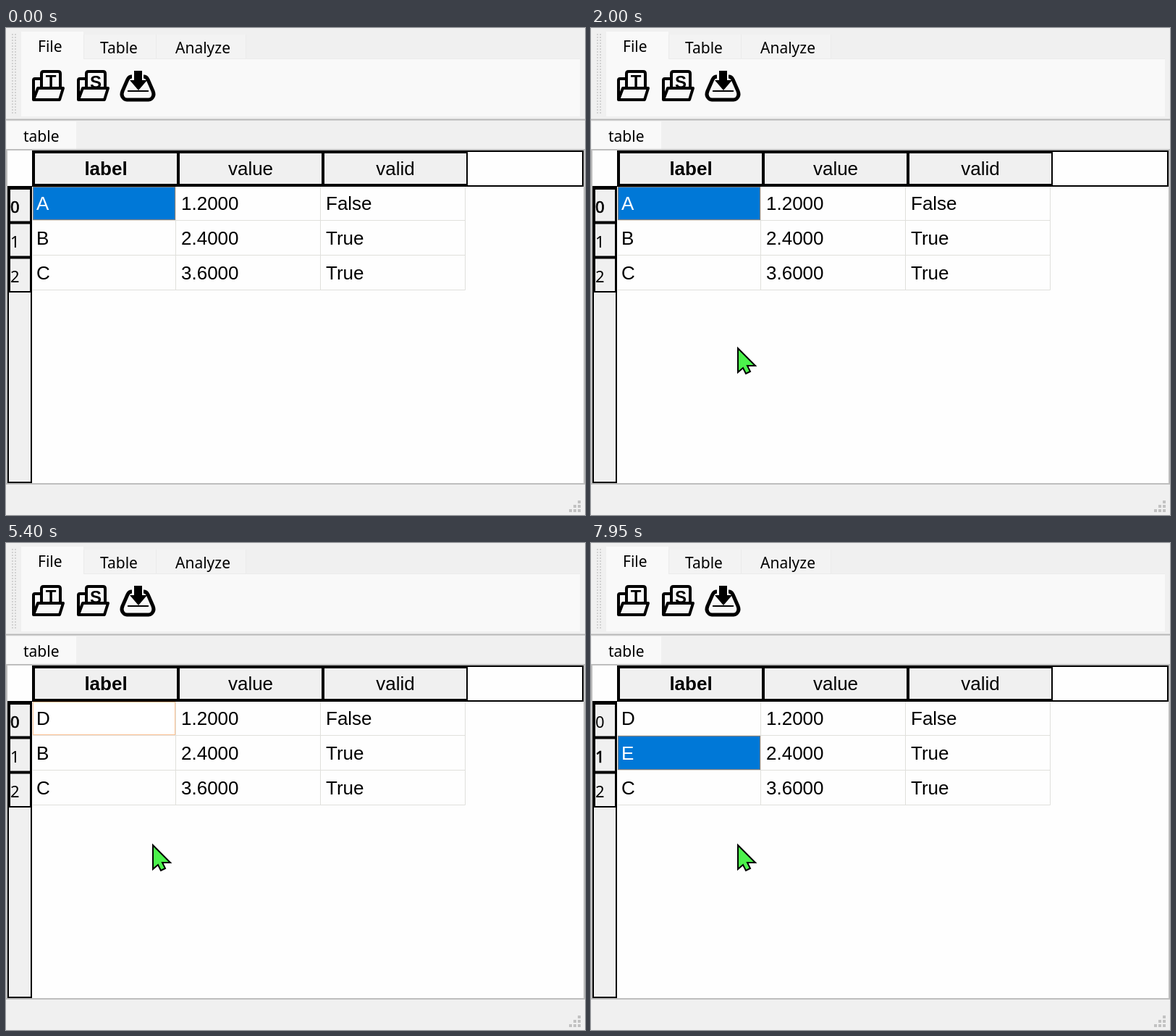
An HTML page for the animation above (8 s loop, 800x672 px).

```html
<!DOCTYPE html>
<html lang="en">
<head>
<meta charset="utf-8">
<title>Table editor</title>
<style>
  html, body { margin: 0; width: 100%; height: 100%; overflow: hidden; background: #f0f0f0; }
  svg { display: block; width: 800px; height: 672px; }
  .ui { font: 21px "Noto Sans", sans-serif; }
  .index { font: 22px "Noto Sans", sans-serif; }
  .grid { font: 26px "Liberation Sans", Arial, sans-serif; }
  .head { text-anchor: middle; }
  .icon { fill: none; stroke: #000; stroke-width: 4; stroke-linejoin: round; }
  .letter { font: 700 24px "Liberation Sans", Arial, sans-serif; text-anchor: middle; fill: #000; stroke: none; }
  .focus { fill: none; stroke: #ff8728; stroke-dasharray: 1 1; }

  .step { animation: 8s step-end infinite; }
  .oldA { animation-name: oldA; fill: #fff; }
  .newD { animation-name: newD; }
  .oldB { animation-name: oldB; }
  .newE { animation-name: newE; }
  .cell0 { animation-name: cell0; }
  .cell1 { animation-name: cell1; }
  .index0 { animation-name: index0; stroke: #000; }
  .index1 { animation-name: index1; stroke: #000; }
  .pointer { animation: pointer 8s ease-out infinite; }

  @keyframes oldA { 0% { visibility: visible } 59%, 100% { visibility: hidden } }
  @keyframes newD {
    0% { visibility: hidden; fill: #000 }
    59% { visibility: visible; fill: #000 }
    69% { visibility: visible; fill: #fff }
    82.5%, 100% { visibility: visible; fill: #000 }
  }
  @keyframes oldB {
    0% { visibility: visible; fill: #000 }
    82.5% { visibility: visible; fill: #fff }
    88%, 100% { visibility: hidden; fill: #fff }
  }
  @keyframes newE {
    0% { visibility: hidden; fill: #000 }
    88% { visibility: visible; fill: #000 }
    95%, 100% { visibility: visible; fill: #fff }
  }
  @keyframes cell0 {
    0% { visibility: visible; fill: #0078d7 }
    59% { visibility: visible; fill: #fff }
    69% { visibility: visible; fill: #0078d7 }
    82.5%, 100% { visibility: hidden; fill: #0078d7 }
  }
  @keyframes cell1 {
    0% { visibility: hidden; fill: #0078d7 }
    82.5% { visibility: visible; fill: #0078d7 }
    88% { visibility: visible; fill: #fff }
    95%, 100% { visibility: visible; fill: #0078d7 }
  }
  @keyframes index0 { 0% { stroke-width: .7 } 82.5%, 100% { stroke-width: 0 } }
  @keyframes index1 { 0% { stroke-width: 0 } 82.5%, 100% { stroke-width: .7 } }
  @keyframes pointer {
    0%, 4% { transform: translate(690px, 680px) }
    12%, 17% { transform: translate(208px, 438px) }
    22%, 28% { transform: translate(202px, 441px) }
    34%, 100% { transform: translate(202px, 416px) }
  }
</style>
</head>
<body>
<svg viewBox="0 0 800 672">
  <defs>
    <pattern id="grip" width="4" height="4" patternUnits="userSpaceOnUse">
      <path d="M0 0h2v2h-2z" fill="#d2d2d2"/>
    </pattern>
  </defs>
  <path fill="#f0f0f0" d="M0 0h800v672H0z"/>

  <!-- ribbon -->
  <path fill="url(#grip)" d="M6 8h8v112H6z"/>
  <path fill="#f3f3f3" d="M108 9h223v34H108z"/>
  <path fill="#f9f9f9" d="M21 5h86v38h686v79H21z"/>
  <path fill="none" stroke="#ebebeb" d="M107.500 9v33.500H793M207.500 9v33M331.500 9v33"/>
  <g class="ui">
    <text x="44" y="33">File</text>
    <text x="130" y="35">Table</text>
    <text x="234" y="35">Analyze</text>
  </g>

  <g class="icon">
    <text class="letter" x="62" y="82">T</text>
    <text class="letter" x="124" y="83">S</text>
    <g id="folder">
      <path d="M49 81V63q0-3 3-3h20q3 0 3 3v18M48 70h-8q-2 0-2 2v27"/>
      <path fill="#f9f9f9" d="M44 83h35l-5 16H38z"/>
    </g>
    <use href="#folder" x="62"/>
    <path stroke-width="5" d="M174 67q-4 0-6 4l-7 16q-2 5 0 8 2 4 6 4h30q4 0 6-4 2-3 0-8l-7-16q-2-4-6-4"/>
    <path stroke-width="2" d="M168 87h29"/>
    <path fill="#000" stroke="none" d="M177 59h11v13h7l-12 14-12-14h6z"/>
  </g>

  <path stroke="#b8b8b8" stroke-width="2" d="M0 126.500h800"/>
  <path fill="#f9f9f9" d="M1 129h96v39H1z"/>
  <text class="ui" x="24" y="157">table</text>

  <!-- table body and headers -->
  <path fill="#fefefe" stroke="#bebebe" stroke-width="2" d="M1 168h798v461H1z"/>
  <path fill="#f0f0f0" stroke="#000" stroke-width="2" d="M3 219h32v408H3z"/>
  <path fill="#f0f0f0" d="M38 171h599v46H38z"/>
  <path fill="none" stroke="#000" stroke-width="2" d="M637 170h160v48H637z"/>
  <path fill="none" stroke="#000" stroke-width="4" d="M637 171H38v46h599M238 171v46M438 171v46"/>
  <path fill="none" stroke="#000" stroke-width="4" d="M4 364V221h30M4 268.500h30M4 316.500h30"/>
  <path fill="none" stroke="#000" stroke-width="2" d="M3 364h31V220"/>
  <path fill="none" stroke="#e0e0dc" d="M37 265.500h597.500M37 313.500h597.500M37 361.500h597.500V219M234.500 219v142M434.500 219v142"/>

  <g class="step cell0">
    <rect x="37" y="219" width="197" height="46"/>
    <rect class="focus" x="37.500" y="219.500" width="196" height="45"/>
  </g>
  <g class="step cell1">
    <rect x="37" y="266" width="197" height="47"/>
    <rect class="focus" x="37.500" y="266.500" width="196" height="46"/>
  </g>

  <g class="index">
    <text class="step index0" x="6" y="255">0</text>
    <text class="step index1" x="6" y="303">1</text>
    <text x="6" y="351">2</text>
  </g>

  <g class="grid">
    <g class="head">
      <text x="138" y="203" font-weight="700">label</text>
      <text x="338" y="203">value</text>
      <text x="538" y="203">valid</text>
    </g>
    <text class="step oldA" x="42" y="251">A</text>
    <text class="step newD" x="42" y="251">D</text>
    <text class="step oldB" x="42" y="299">B</text>
    <text class="step newE" x="42" y="299">E</text>
    <text x="42" y="347">C</text>
    <text x="242" y="251">1.2000</text>
    <text x="242" y="299">2.4000</text>
    <text x="242" y="347">3.6000</text>
    <text x="442" y="251">False</text>
    <text x="442" y="299">True</text>
    <text x="442" y="347">True</text>
  </g>

  <!-- resize grip -->
  <path fill="none" stroke="#c2c2c2" stroke-width="4" stroke-dasharray="4 2" d="M790 654h4M784 660h10M778 666h16"/>

  <path class="pointer" fill="#4cf24c" stroke="#000" stroke-width="2"
        d="M1 1V34L8 28 12 36 18 33 14 25H25z"/>
</svg>
</body>
</html>
```
